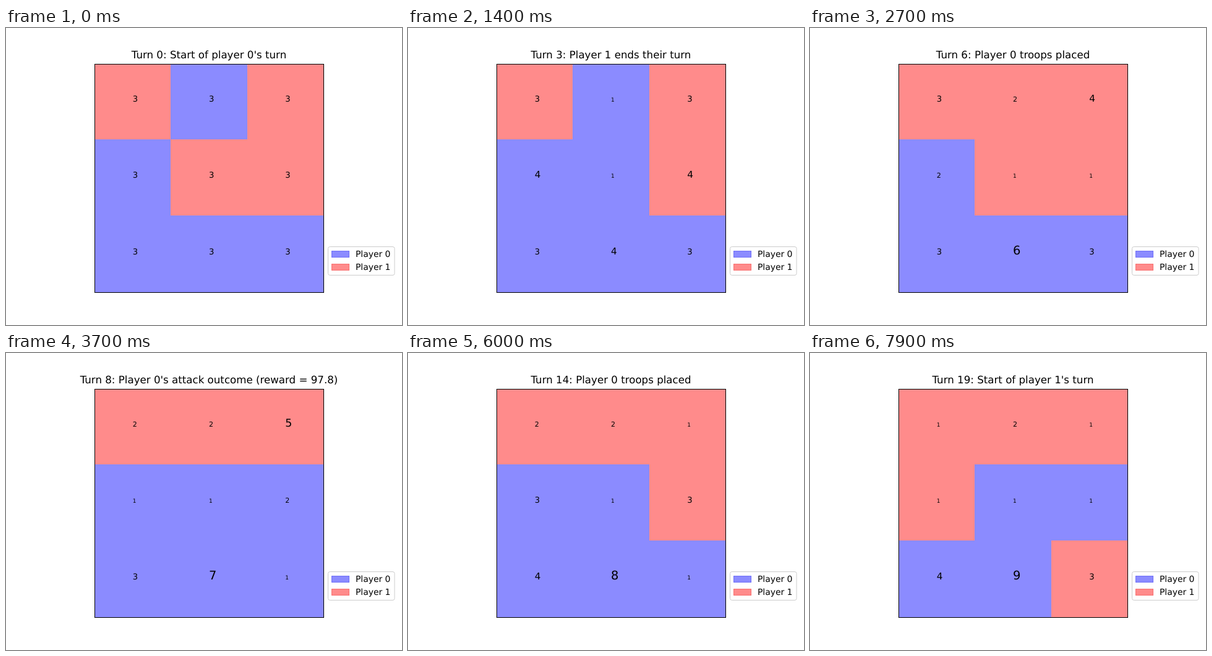
These frames come from a looping animation (640x480 px, 8 s). An HTML page:

```html
<!DOCTYPE html>
<html lang="en">
<head>
<meta charset="utf-8">
<title>Territory game</title>
<style>
  html, body { margin: 0; width: 100%; height: 100%; overflow: hidden; background: #fff; }
  svg { display: block; }
  text { font-family: "DejaVu Sans", Verdana, sans-serif; fill: #000; text-rendering: geometricPrecision; }
</style>
</head>
<body>
<svg id="stage" width="640" height="480" viewBox="0 0 640 480"></svg>
<script>
const STEP = 100;
const COLORS = ["#8b8bff", "#ff8b8b"];
const EDGES = ["#6f6ff8", "#f86f6f"];
const XS = [143, 266, 390, 513];
const YS = [58, 180, 303, 427];
const TEXT_X = [204.8, 328, 451.2];
const BASELINES = [119, 242, 366];

// One turn per line: cells reinforced | attacks as "from to left there reward" | end
const TURNS = `
7|1 4 2 3 -0.1
4|4 1 1 2 -0.30000000000000004
3|1 4 1 1 98.1
5|end
37|3 0 2 3 -0.3|end
2|5 4 1 3 97.9|4 1 1 2 98.4
7|3 4 1 1 98.2
2|0 3 2 1 -0.1
7|8 5 1 2 97.8
2|2 5 4 2 -0.2
37|5 2 2 3 -0.1
2|end
35|5 2 1 4 -0.2|end
2|2 5 1 3 97.6|end
6|3 0 1 2 -0.2
5|0 3 1 1 98.2
4|4 5 2 3 -0.1
5|5 8 1 3 97.9
7|4 5 1 1 98.1`.trim().split("\n");

function playGame() {
  const owners = [..."101011000"].map(Number);
  const troops = Array(9).fill(3);
  const frames = [];
  const show = (turn, ...lines) => {
    lines[0] = `Turn ${turn}: ${lines[0]}`;
    frames.push({ lines, owners: [...owners], troops: [...troops] });
  };
  TURNS.forEach((row, turn) => {
    const player = turn % 2;
    const [placed, ...actions] = row.split("|");
    show(turn, `Start of player ${player}'s turn`);
    for (const cell of placed) troops[cell]++;
    show(turn, `Player ${player} troops placed`);
    for (const action of actions) {
      if (action === "end") {
        show(turn, `Player ${player} ends their turn`);
        continue;
      }
      const [from, to, left, there, reward] = action.split(" ");
      show(turn, `Player ${player} attacks`, `from territory ${from} to ${to}`);
      troops[from] = +left;
      troops[to] = +there;
      if (reward > 50) owners[to] = player;
      show(turn, `Player ${player}'s attack outcome (reward = ${reward})`);
    }
  });
  show(TURNS.length, `Start of player ${TURNS.length % 2}'s turn`);
  return frames;
}

const stage = document.getElementById("stage");

function add(tag, attrs, content = "") {
  const node = document.createElementNS("http://www.w3.org/2000/svg", tag);
  for (const key in attrs) node.setAttribute(key, attrs[key]);
  node.textContent = content;
  stage.append(node);
  return node;
}

const cells = Array.from({ length: 9 }, (_, i) => {
  const c = i % 3, r = Math.floor(i / 3);
  return add("rect", {
    x: XS[c], y: YS[r], width: XS[c + 1] - XS[c], height: YS[r + 1] - YS[r],
    "shape-rendering": "crispEdges"
  });
});
const counts = cells.map((_, i) =>
  add("text", { x: TEXT_X[i % 3], y: BASELINES[Math.floor(i / 3)] }));
add("rect", { x: 143.5, y: 58.5, width: 370, height: 369, fill: "none", stroke: "#000" });

const titleStyle = { x: 328, "font-size": 16.667, "text-anchor": "middle" };
const upper = add("text", { ...titleStyle, y: 32 });
const title = add("text", { ...titleStyle, y: 49 });

add("rect", { x: 520.5, y: 353.5, width: 107.5, height: 46, rx: 3, fill: "#fff", stroke: "#ccc" });
COLORS.forEach((fill, i) => {
  const y = 360.5 + i * 21;
  add("rect", { x: 526.5, y, width: 28, height: 10, fill, stroke: EDGES[i] });
  add("text", { x: 565, y: y + 9.5, "font-size": 13.889 }, `Player ${i}`);
});

// Point size grows with the troop count up to 14pt, at 100 dpi
const fontSize = n => Math.min(14, 5 + 1.5 * n) * 100 / 72;

const frames = playGame();
let current = -1;

function draw(now) {
  const index = Math.floor(now / STEP) % frames.length;
  if (index !== current) {
    current = index;
    const { lines, owners, troops } = frames[index];
    title.textContent = lines[lines.length - 1];
    upper.textContent = lines.length > 1 ? lines[0] : "";
    cells.forEach((cell, i) => {
      cell.setAttribute("fill", COLORS[owners[i]]);
      counts[i].textContent = troops[i];
      counts[i].setAttribute("font-size", fontSize(troops[i]));
    });
  }
}

let start;
function tick(now) {
  start ??= now;
  draw(Math.max(0, now - start));
  requestAnimationFrame(tick);
}
draw(0);
requestAnimationFrame(tick);
</script>
</body>
</html>
```
